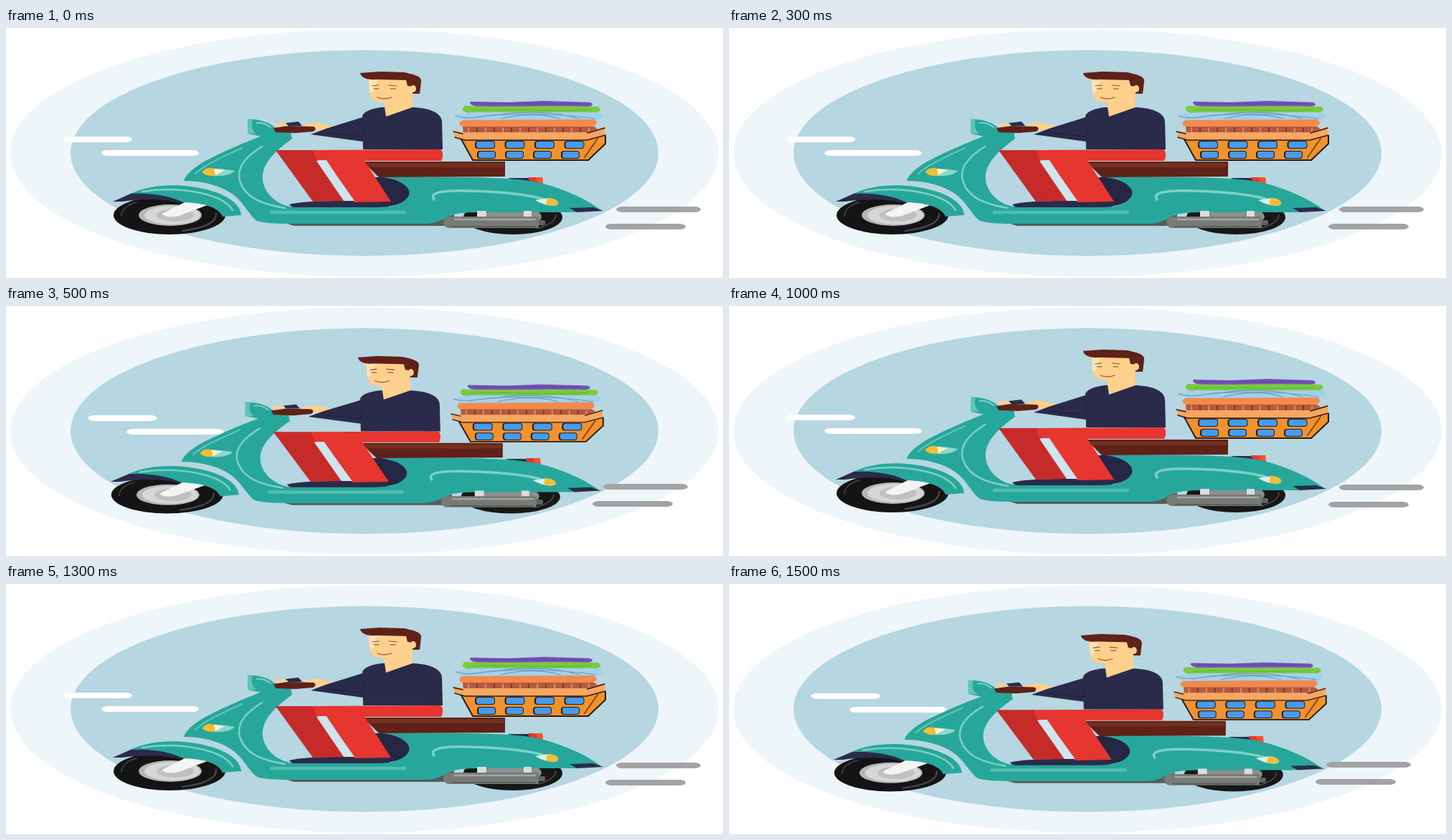
Recreate the animation shown at these times as an HTML page with a canvas. Size 1000 by 350 pixels, loop 2 s.

```html
<!DOCTYPE html>
<html lang="en">
<head>
<meta charset="utf-8">
<title>Scooter delivery</title>
<style>
html, body { margin: 0; width: 100%; height: 100%; overflow: hidden; background: #fff; }
canvas { display: block; width: 1000px; height: 350px; }
</style>
</head>
<body>
<canvas id="stage" width="1000" height="350"></canvas>
<script>
const ctx = document.getElementById('stage').getContext('2d');
const TEAL = '#27a79b', TEAL_LIGHT = '#7fd0c6', NAVY = '#2a2b4a', SKIN = '#fdd08c';
const RED = '#e7352f', DARK_RED = '#c62b2a', BROWN = '#5f2118', INK = '#2b1a10';

function fill(d, color) {
  ctx.fillStyle = color;
  ctx.fill(new Path2D(d));
}

function line(d, color, width) {
  ctx.strokeStyle = color;
  ctx.lineWidth = width;
  ctx.lineCap = 'round';
  ctx.lineJoin = 'round';
  ctx.stroke(new Path2D(d));
}

function oval(x, y, rx, ry, color) {
  ctx.fillStyle = color;
  ctx.beginPath();
  ctx.ellipse(x, y, rx, ry, 0, 0, Math.PI * 2);
  ctx.fill();
}

function bar(x, y, w, h, r, color) {
  ctx.fillStyle = color;
  ctx.beginPath();
  ctx.roundRect(x, y, w, h, r);
  ctx.fill();
}

function backdrop() {
  ctx.fillStyle = '#fff';
  ctx.fillRect(0, 0, 1000, 350);
  oval(500, 175, 494, 173, '#eef6fa');
  oval(500, 175, 410, 144, '#b6d6e1');
}

function wheels() {
  oval(707, 265, 69, 24, '#171717');
  line('M742 280C757 276 766 270 767 262', '#44444a', 2);
  oval(707, 264, 40, 14, '#8d8f90');

  oval(228, 262, 78, 27, '#141414');
  line('M246 284C276 280 294 272 293 260', '#44444a', 2.5);
  line('M161 263C161 254 170 247 182 244', '#3a3a40', 2);
  oval(229, 262, 44, 15, '#b5b5b5');
  oval(232, 262, 39, 13, '#d6d6d6');
  oval(236, 262, 26, 9, '#c0c0c0');
  fill('M218 260L251 243L286 246L244 262C234 266 219 265 218 260Z', '#f4f4f4');
}

function frontFender() {
  fill('M149 243L176 231L222 230C236 234 244 240 246 246C225 239 190 239 162 243Z', NAVY);
  fill('M174 232C196 221 228 218 258 222C302 228 327 244 328 262L302 264C297 252 279 245 247 244C236 238 210 230 174 232Z', TEAL);
  line('M190 229C240 221 302 231 316 255', TEAL_LIGHT, 2.5);
}

function exhaust() {
  bar(657, 256, 13, 10, 1, '#d9dddd');
  bar(722, 256, 11, 10, 1, '#d9dddd');
  bar(735, 269, 17, 7, 2, '#62645f');
  bar(610, 264, 133, 16, [14, 4, 4, 14], '#777a75');
  line('M626 268H738', '#a3a6a1', 2.5);
  line('M622 278H738', '#555853', 1.5);
}

function body() {
  fill('M500 209H540C558 213 566 224 562 235C556 248 535 251 500 251Z', '#252744');
  fill('M395 247C410 243 440 242 472 242L535 242V252H400Z', NAVY);
  fill('M728 209H748L749 222H733Z', RED);
  fill('M738 209H748L749 220H743Z', '#f4512a');
  fill('M700 210H728L731 215H712Z', NAVY);
  fill('M385 272H585L625 261V277H402Z', '#565c5a');
  fill('M362 149C335 159 298 175 273 189C257 199 250 207 248 214C276 214 299 221 315 232C332 244 338 261 350 270C360 273 374 274 396 274H584C602 274 609 268 620 262C634 258 650 258 680 258H791L830 255C808 238 772 223 742 216C708 209 650 208 525 209C555 213 565 225 562 234C555 248 536 251 516 251H402C382 249 366 237 360 221C353 200 363 181 399 155L397 147Z', TEAL);
  line('M357 166C325 186 319 204 330 223C338 236 352 246 389 252', TEAL_LIGHT, 2.5);
  line('M264 204C276 192 305 179 329 168', '#68c4b9', 2);
  line('M370 258H556', '#55bdb1', 4.5);
  line('M597 240C590 230 610 227 645 228C690 229 725 233 748 239', TEAL_LIGHT, 3.5);
  fill('M786 252L819 251L833 256L796 258Z', NAVY);
  exhaust();

  fill('M274 202C278 196 290 195 319 200C315 207 286 211 274 202Z', '#8bd7ce');
  fill('M274 202C277 196 284 195 290 197L292 206C284 208 277 206 274 202Z', '#f5bd2f');
  fill('M290 197L305 199L292 206Z', '#fff4cc');
  fill('M738 241L756 238C768 239 772 243 769 248C760 250 750 248 738 241Z', '#d9f1e8');
  fill('M755 238C768 239 772 243 769 248L753 248Z', '#f5bd2f');
}

function seat() {
  fill('M498 187H696V208L520 209Z', BROWN);
  fill('M500 189H694V195H506Z', '#74301f');
}

function rider() {
  fill('M376 171H429L435 186L472 242L428 243Z', DARK_RED);
  fill('M428 171L606 170C610 172 610 181 607 186L500 186L537 243L486 244L447 185H433Z', RED);
  fill('M433 186L446 185L486 242H471Z', '#cfe4ec');

  fill('M412 139C418 133 431 131 441 134L455 137L451 144L424 143Z', SKIN);
  fill('M446 141L497 125L526 112L520 159L498 159L425 149Z', NAVY);
  fill('M498 170L497 123C500 116 510 113 524 111L567 111C592 112 607 119 608 131L609 170Z', NAVY);
  line('M500 138L498 152L448 147', '#1d1e37', 1);

  fill('M505 71H560L567 81V111L530 124L527 104C514 104 508 100 507 91Z', SKIN);
  fill('M506 73H518C512 83 517 92 507 91Z', '#fee4b5');
  fill('M494 63L521 61L555 62C568 65 580 67 579 75L577 92H567V82L560 81L558 73L518 72C502 73 495 69 494 63Z', BROWN);
  oval(568, 85, 4, 5, SKIN);
  line('M511 81L520 80M534 80L545 81', '#8a5a3a', 1.2);
  line('M513 85H520M536 85H543', '#6b4a35', 1);
  line('M518 97C525 100 533 99 538 97', '#9c4b31', 1.2);
}

function handlebar() {
  fill('M337 128C351 127 368 132 374 139L398 147L397 154L362 153L337 148Z', TEAL);
  fill('M337 128L344 129C341 137 344 144 349 148L337 148Z', '#62c4b8');
  line('M350 133C357 132 364 135 369 139', TEAL_LIGHT, 2);
  fill('M373 134L388 133L394 137L376 138Z', SKIN);
  fill('M390 133L408 131L413 137H394Z', NAVY);
  fill('M373 140L394 137L429 138C433 140 432 143 428 145L404 147L376 146Z', BROWN);
}

function laundry() {
  fill('M648 103L700 104L750 102L814 104C820 106 819 109 812 110L658 110C650 109 645 106 648 103Z', '#7551b8');
  fill('M640 109C690 111 770 108 826 110C831 114 829 118 822 118L650 119C636 119 634 113 640 109Z', '#7ac943');
  line('M656 106H805', '#643fa6', 1);
  line('M650 115C700 112 760 118 815 114', '#62b336', 1);
  fill('M624 122L652 118H826C836 122 834 127 823 129H636Z', '#a3d0ea');
  line('M627 123C650 130 665 121 690 121C720 116 768 117 800 127M690 127C720 120 748 120 773 127M650 126C690 119 763 118 822 127', '#6b9bc0', 1.2);
  fill('M637 129L820 128C826 131 825 136 818 138L640 139C631 137 630 132 637 129Z', '#f28a4b');
  fill('M637 138H820C827 141 826 146 820 149H638Z', '#b5593f');
  for (let x = 645; x < 822; x += 12) line(`M${x} 140V147`, x % 24 > 12 ? '#d58b6b' : '#7d3a29', 2);
}

function basket() {
  fill('M632 151H836V162L812 186H651Z', '#f0922e');
  line('M634 154L651 185H812L836 162V151', INK, 2);
  for (let i = 0; i < 4; i++) {
    const top = 656 + i * 41.5, low = 659 + i * 39;
    bar(top - 2, 158, 28, 11, 4, INK);
    bar(top, 159, 25, 9, 3, '#459bed');
    bar(low - 2, 172, 26, 11, 4, INK);
    bar(low, 173, 23, 9, 3, '#459bed');
  }
  line('M825 155L807 181', '#8e4418', 2);
  fill('M624 144L638 146H812L835 138V150L810 157H640L626 153Z', '#f6a761');
  line('M624 145L637 148M811 147L835 140M626 153L640 157H810L836 150', INK, 1.4);
}

function speedLines(alt) {
  const dx = alt ? 35 : 0, back = alt ? -18 : 0, dy = alt ? 1 : 0;
  const cap = { x: 9, y: 4 };
  bar(79 + dx, 152 + dy, 97, 8, cap, '#fff');
  bar(133 + dx, 171 + dy, 136, 8, cap, '#fff');
  bar(851 + back, 250 - dy, 118, 8, cap, '#a3a3a3');
  bar(836 + back, 274 - dy, 112, 8, cap, '#a3a3a3');
}

function draw(ms) {
  const alt = Math.floor(ms / 500) % 2 === 1;
  backdrop();
  speedLines(alt);
  ctx.save();
  // The scooter squashes towards the ground on every other beat.
  if (alt) ctx.transform(1, 0, 0, 0.967, -3.2, 11);
  wheels();
  frontFender();
  body();
  laundry();
  basket();
  seat();
  rider();
  handlebar();
  ctx.restore();
}

const start = performance.now();
function tick() {
  draw((performance.now() - start) % 2000);
  requestAnimationFrame(tick);
}
tick();
</script>
</body>
</html>
```
